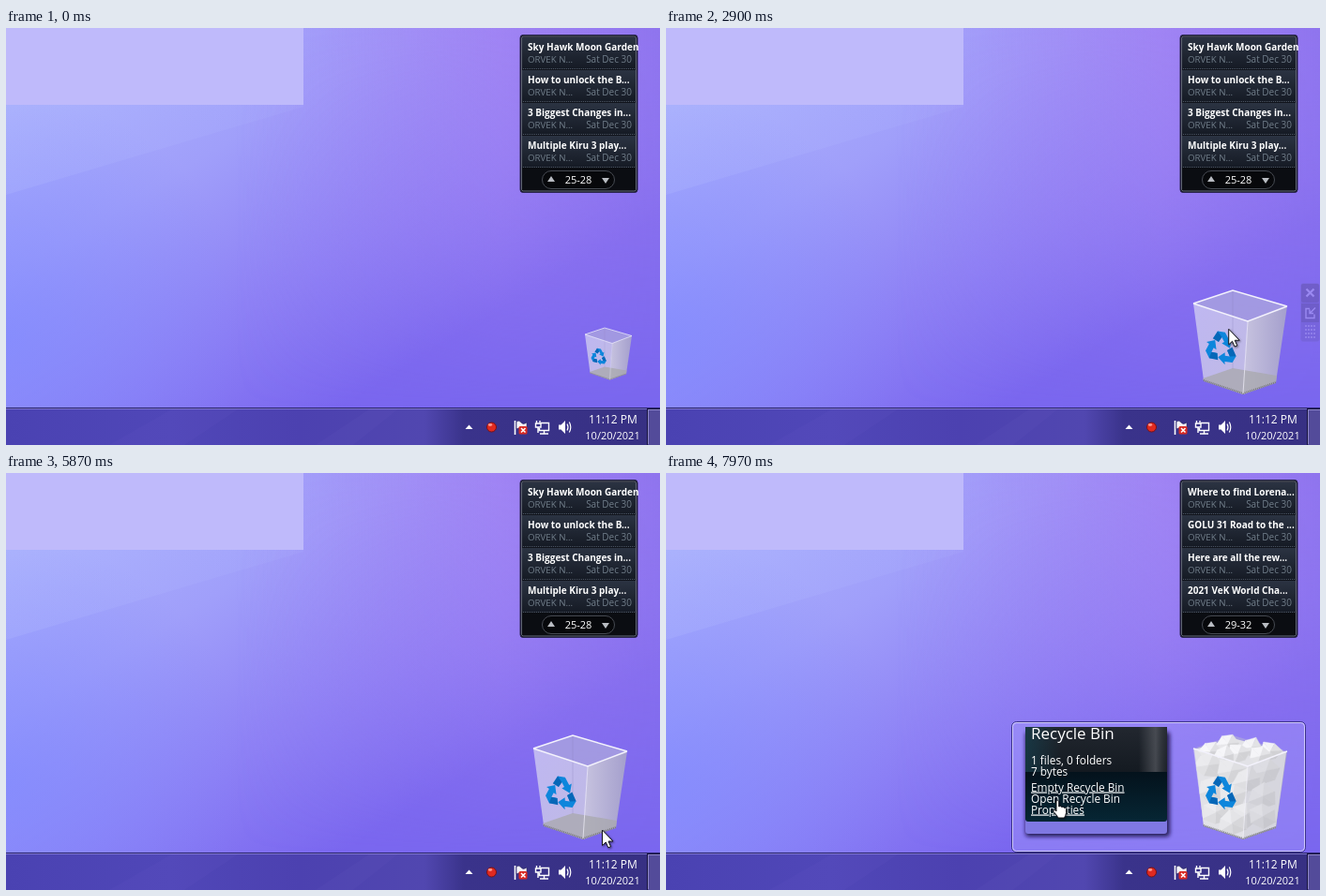
Recreate the animation shown at these times as an HTML page. Size 697 by 445 pixels, loop 8000 ms.

```html
<!DOCTYPE html>
<html lang="en">
<head>
<meta charset="utf-8">
<title>Desktop bin gadget</title>
<style>
html, body { margin: 0; width: 100%; height: 100%; overflow: hidden; background: #8577f2; }
svg { display: block; width: 697px; height: 445px; font-family: "Open Sans", "Noto Sans", sans-serif; }
text { white-space: pre; }
</style>
</head>
<body>
<svg viewBox="0 0 697 445" xmlns="http://www.w3.org/2000/svg">
<defs>
  <linearGradient id="sky" gradientUnits="userSpaceOnUse" x1="90" y1="20" x2="330" y2="420">
    <stop offset="0" stop-color="#a9b0fd"/><stop offset=".35" stop-color="#a09ffa"/>
    <stop offset=".7" stop-color="#8d80f5"/><stop offset="1" stop-color="#7a67ef"/>
  </linearGradient>
  <linearGradient id="side" x1="0" x2="1" y1="0" y2="0">
    <stop offset=".35" stop-color="#a17ff2" stop-opacity="0"/>
    <stop offset=".76" stop-color="#a17ff2" stop-opacity=".8"/>
    <stop offset="1" stop-color="#8f74ee"/>
  </linearGradient>
  <linearGradient id="fade" x1="0" x2="0" y1="0" y2="1">
    <stop offset="0" stop-color="#fff"/><stop offset=".45" stop-color="#aaa"/><stop offset="1" stop-color="#000"/>
  </linearGradient>
  <mask id="upper"><rect width="697" height="405" fill="url(#fade)"/></mask>
  <radialGradient id="corner" gradientUnits="userSpaceOnUse" cx="0" cy="330" r="260">
    <stop offset="0" stop-color="#7f8aff" stop-opacity=".7"/><stop offset="1" stop-color="#7f8aff" stop-opacity="0"/>
  </radialGradient>
  <linearGradient id="ray" x1="0" x2="1" y1="0" y2="0">
    <stop offset="0" stop-color="#b4bcff" stop-opacity=".25"/><stop offset="1" stop-color="#b4bcff" stop-opacity=".1"/>
  </linearGradient>
  <linearGradient id="bar" x1="0" x2="1" y1="0" y2="0">
    <stop offset="0" stop-color="#4a42b2"/><stop offset=".25" stop-color="#5047b8"/>
    <stop offset=".45" stop-color="#4c41b0"/><stop offset=".64" stop-color="#5147b0"/>
    <stop offset=".7" stop-color="#3a338b"/><stop offset="1" stop-color="#373083"/>
  </linearGradient>
  <linearGradient id="news" x1="0" x2="0" y1="0" y2="1">
    <stop offset="0" stop-color="#2b3342"/><stop offset="1" stop-color="#151a24"/>
  </linearGradient>
  <linearGradient id="wallL" x1="0" x2="1" y1="0" y2="1">
    <stop offset="0" stop-color="#d3d0f2" stop-opacity=".75"/><stop offset="1" stop-color="#cbc8e2" stop-opacity=".85"/>
  </linearGradient>
  <linearGradient id="wallR" x1="0" x2="1" y1="0" y2="0">
    <stop offset="0" stop-color="#d0cede" stop-opacity=".9"/><stop offset="1" stop-color="#a9a6c8" stop-opacity=".88"/>
  </linearGradient>
  <linearGradient id="card" x1="0" x2="0" y1="0" y2="1">
    <stop offset="0" stop-color="#22272f"/><stop offset=".47" stop-color="#141a21"/>
    <stop offset=".48" stop-color="#04121c"/><stop offset="1" stop-color="#062634"/>
  </linearGradient>
  <linearGradient id="glow" x1="0" x2="1" y1="0" y2="0">
    <stop offset="0" stop-color="#16404f" stop-opacity=".7"/><stop offset=".25" stop-color="#16404f" stop-opacity="0"/>
    <stop offset=".8" stop-color="#54575e" stop-opacity="0"/><stop offset=".92" stop-color="#54575e" stop-opacity=".75"/>
    <stop offset="1" stop-color="#30343b" stop-opacity=".3"/>
  </linearGradient>
  <linearGradient id="tip" x1="0" x2="0" y1="0" y2="1">
    <stop offset="0" stop-color="#fff"/><stop offset="1" stop-color="#e0e0ee"/>
  </linearGradient>
  <filter id="soft" x="-20%" y="-20%" width="150%" height="150%"><feGaussianBlur stdDeviation="2.2"/></filter>
  <filter id="shade" x="-30%" y="-30%" width="180%" height="180%">
    <feDropShadow dx="1" dy="1" stdDeviation="1" flood-color="#000" flood-opacity=".5"/>
  </filter>
</defs>

<rect width="697" height="445" fill="url(#sky)"/>
<rect width="697" height="405" fill="url(#side)" mask="url(#upper)"/>
<rect width="300" height="405" fill="url(#corner)"/>
<path d="M0 0H317V84L0 178Z" fill="url(#ray)"/>
<rect x="-1" y="-236" width="318" height="318" fill="#bfbafb"/>

<g id="panel">
  <rect x="368.5" y="265.5" width="313" height="139" rx="5" fill="#b3acff" fill-opacity=".3" stroke="#2f2979" stroke-opacity=".85"/>
  <rect x="369.5" y="266.5" width="311" height="137" rx="4" fill="none" stroke="#e0dcff" stroke-opacity=".8"/>
  <rect x="383" y="276" width="154" height="112" rx="4" fill="#14103f" opacity=".85" filter="url(#soft)"/>
  <rect x="383" y="280" width="151" height="105" rx="3" fill="#7f78e2"/>
  <path d="M383 271H534V369Q534 372 531 372H386Q383 372 383 369Z" fill="url(#card)"/>
  <path d="M383 271H534V319H383Z" fill="url(#glow)"/>
  <g id="cardText" fill="#fff"></g>
</g>

<g id="bin">
  <path d="M562 294L604 280L662 297L620 313Z" fill="#aaa4df" fill-opacity=".8"/>
  <path d="M562 294L620 313L615 391L573 376Z" fill="url(#wallL)"/>
  <path d="M620 313L662 297L650 378L615 391Z" fill="url(#wallR)"/>
  <path d="M604 280V364" stroke="#8d88bd" stroke-opacity=".35"/>
  <path d="M572 374L604 363L651 371L650 379L615 391L573 377Z" fill="#a9a8ad" opacity=".75"/>
  <path d="M573 376L615 390L650 378" fill="none" stroke="#77777d" stroke-width="2" stroke-dasharray="1 1"/>
  <g id="paper"></g>
  <path d="M562 294L620 313L662 297" fill="none" stroke="#f3f2fc" stroke-width="1.4"/>
  <path id="rim" d="M562 294L604 280L662 297" fill="none" stroke="#f3f2fc" stroke-width="1.4"/>
  <path d="M620 313L615 390" stroke="#f4f3fb" stroke-opacity=".7"/>
  <g id="mark" transform="matrix(.87 .14 0 .94 591.500 342)"></g>
</g>

<g id="feed">
  <rect x="548" y="7.5" width="125" height="168" rx="3" fill="#10131b" stroke="#2a2550"/>
  <rect x="549.5" y="9" width="122" height="165" rx="2" fill="none" stroke="#9aa0b4" stroke-opacity=".6"/>
  <g id="rows"></g>
  <rect x="550" y="149" width="121" height="24" fill="#0b0d12"/>
  <rect x="571.5" y="152.5" width="77" height="19" rx="9.5" fill="#07080b" stroke="#464a52"/>
  <path d="M577 164L581 158L585 164ZM635 160H643L639 166Z" fill="#b9bcc2"/>
  <g id="listA"></g><g id="listB"></g>
</g>

<g id="tools">
  <rect x="676.5" y="272.5" width="20" height="62" rx="3" fill="#45416e" fill-opacity=".7" stroke="#6c66a8" stroke-opacity=".5"/>
  <rect x="677" y="273" width="19" height="20" rx="2" fill="#2b2a38"/>
  <path d="M682.5 278.5L690.5 286.5M690.5 278.5L682.5 286.5" stroke="#fff" stroke-width="2.200"/>
  <rect x="677" y="294" width="19" height="20" fill="#2b2a38"/>
  <rect id="hot" x="677" y="293" width="19" height="20" fill="#6fbdf0" stroke="#bfe6ff"/>
  <g fill="none" stroke="#fff" stroke-width="1.4">
    <path id="shrink" d="M686 299.500H682V309.500H691V305.500M692 298.500L686.5 304M686 300.500V304.500H690"/>
    <path id="grow" d="M681.5 298.5H691.5V308.5H681.5ZM684 306L689 301M685 301H689V305" stroke="#0c1420"/>
  </g>
  <path id="dots" fill="#c9c8d6"/>
</g>

<g id="taskbar">
  <rect y="405" width="697" height="40" fill="url(#bar)"/>
  <path d="M110 445L180 405H250L190 445ZM330 445L390 405H420L370 445Z" fill="#8176d8" opacity=".05"/>
  <path d="M0 405.5H697" stroke="#29246b"/><path d="M0 406.5H697" stroke="#8f87d8" stroke-opacity=".75"/>
  <rect x="683.5" y="406.5" width="14" height="39" fill="#6a62ad" fill-opacity=".55" stroke="#17143f"/>
  <path d="M684.5 444V407.5H697" fill="none" stroke="#a9a3da" stroke-opacity=".7"/>
  <path d="M489.500 428L493.500 423.500L497.500 428Z" fill="#fff"/>
  <circle cx="517.500" cy="426" r="5" fill="#e02a20" stroke="#7d1014"/>
  <ellipse cx="516" cy="423.500" rx="2.200" ry="1.400" fill="#ff958a"/>
  <path d="M542.500 419V434" stroke="#fff" stroke-width="1.600"/>
  <path d="M544 420Q547 418 549 421T555 421V428Q552 430 549 428T544 428Z" fill="#f4f4fa" stroke="#2b2860" stroke-width=".6"/>
  <rect x="546.500" y="425" width="9" height="8.500" rx="1.500" fill="#d92a23"/>
  <path d="M549 427L553.500 431.500M553.500 427L549 431.500" stroke="#fff" stroke-width="1.500"/>
  <g fill="none" stroke="#fff" stroke-width="1.400">
    <path d="M570 421.500H578.500V429.500H568.500V427M573.500 430V433M569 433H578M565.500 419V422M569 419V422M564.500 422H570V426H564.500ZM567 426V432"/>
    <path d="M598 422.500Q600 426 598 429.500M600.300 420.500Q603.300 426 600.300 431.500" stroke-width="1.200"/>
  </g>
  <path d="M589 423.500H591.500L596 419V433L591.500 428.500H589Z" fill="#fff"/>
  <g id="clock" fill="#fff" text-anchor="middle"></g>
</g>

<g id="file">
  <path d="M-16 0H7L16 9V42H-16Z" fill="#f5f5ff" stroke="#8886ad" stroke-width=".8"/>
  <path d="M7 0V9H16Z" fill="#c9c9e6" stroke="#8886ad" stroke-width=".8"/>
  <text x="-12" y="15" font-size="13" font-weight="700" font-style="italic" style="font-family:'Noto Serif',serif" fill="#4a41a8">A</text>
  <path d="M-13 18.500H13" stroke="#43a0a8" stroke-width="2"/>
  <path d="M0 8H7M0 11.500H12M0 14.500H12M-12 24H-1M-12 27H-1M-12 30H-1M-12 33H-1M-12 37H12" stroke="#a7a5cc"/>
  <rect x="1" y="23" width="12" height="10" fill="#5c9fd8"/><path d="M1 33L6 27L9 30L13 28V33Z" fill="#3a6f83"/>
  <text x="0" y="58" font-size="11" fill="#fff" text-anchor="middle" filter="url(#shade)">sussybaka.rtf</text>
</g>

<g id="hint">
  <rect x="542.500" y="361.500" width="152" height="19" rx="2" fill="url(#tip)" stroke="#767676"/>
  <text x="548" y="375" font-size="11.500" fill="#4c4c55">Click to toggle details view</text>
</g>

<g id="arrow" filter="url(#shade)">
  <path d="M0 0V16.500L3.800 13L6.300 18.800L9 17.600L6.500 12H11.500Z" fill="#fff" stroke="#16161c" stroke-width="1"/>
</g>
<g id="hand" filter="url(#shade)">
  <path d="M3.500 1.500Q5 0 6.200 1.500V7.500Q8 6.200 9 8Q10.800 7 11.600 8.800Q13.800 8 14 10V14Q13.500 17 12 19.500H5.500Q4 16.500 .5 12.800Q-.5 10.500 1.500 10.800L3.500 12.500Z" fill="#fff" stroke="#16161c"/>
</g>
</svg>

<script>
const LOOP = 8000;
const el = id => document.getElementById(id);
const fill = (id, html) => { el(id).innerHTML = html; };
const label = (x, y, size, str, more = "") => `<text x="${x}" y="${y}" font-size="${size}" ${more}>${str}</text>`;

function headlines(titles, range) {
  return titles.map((s, i) => label(556, 24 + 35 * i, 10, s, 'font-weight="700" fill="#fff"')).join("") +
    label(610, 166, 11, range, 'fill="#fff" text-anchor="middle"');
}

fill("rows", [0, 1, 2, 3].map(i => {
  const y = 10 + 35 * i;
  return `<rect x="550" y="${y}" width="121" height="34" fill="url(#news)"/>
    <path d="M551 ${y + 33.5}H671" stroke="#4c5563" stroke-dasharray="1 1"/>` +
    label(556, y + 26.5, 9.7, "ORVEK N...", 'fill="#717e8a"') +
    label(667, y + 26.5, 10, "Sat Dec 30", 'fill="#717e8a" text-anchor="end"');
}).join(""));
fill("listA", headlines(["Sky Hawk Moon Garden", "How to unlock the B...", "3 Biggest Changes in...", "Multiple Kiru 3 play..."], "25-28"));
fill("listB", headlines(["Where to find Lorena...", "GOLU 31 Road to the ...", "Here are all the rew...", "2021 VeK World Cha..."], "29-32"));
fill("clock", label(647, 422, 12, "11:12 PM") + label(646.5, 438.5, 11, "10/20/2021"));

const line = 'text-decoration="underline"';
fill("cardText", label(389, 284, 17, "Recycle Bin") + label(389, 310.5, 11.8, "1 files, 0 folders") +
  label(389, 322.5, 11.8, "7 bytes") + label(389, 339.5, 11.8, "Empty Recycle Bin", line) +
  label(389, 351.5, 11.8, "Open Recycle Bin") + label(389, 363.5, 11.8, "Properties", line));

// Three chasing arrows, each with a dark fold.
fill("mark", [0, 120, 240].map(a => `<g transform="rotate(${a})">
  <path d="M-8 -11L-4 -19H5L10 -11L13 -13L11 -2L1 -6L4 -8L1 -13L-3 -7Z" fill="#0d86dc"/>
  <path d="M-4 -19L1 -13L-3 -7L-10 -10Z" fill="#0667b8"/></g>`).join(""));

// A crumpled ball: six facets, lit from the upper left.
function wad(x, y, r, n, lo, hi) {
  const pts = [...Array(6)].map((_, i) => {
    const a = i * Math.PI / 3 + n, k = r * (.9 + .12 * Math.sin(n * 5 + i * 3));
    return [a, x + k * Math.cos(a), y + k * Math.sin(a) * .9];
  });
  return pts.map(([a, u, v], i) => {
    const [, p, q] = pts[(i + 1) % 6];
    const g = Math.round(lo + (hi - lo) * (.5 - .5 * Math.cos(a + .5 - .8)));
    const tone = `rgb(${g},${g},${g + 3})`;
    return `<polygon points="${x},${y} ${u},${v} ${p},${q}" fill="${tone}" stroke="${tone}" stroke-width=".4"/>`;
  }).join("");
}
const pile = [[580, 297], [644, 297], [599, 289], [624, 293], [610, 299], [633, 302], [595, 302]];
const inside = [[578, 312], [602, 318], [639, 318], [620, 328], [582, 338], [604, 345], [636, 345],
  [586, 362], [619, 364], [636, 366], [603, 374]];
fill("paper", '<path d="M563 295L604 283L661 298L650 377L615 390L573 376Z" fill="#e2e2e7"/>' +
  pile.map(([x, y], i) => wad(x, y, 13, i, 208, 248)).join("") +
  '<clipPath id="walls"><path d="M563 295L620 313L661 298L650 377L615 390L573 376Z"/></clipPath>' +
  '<g clip-path="url(#walls)">' + inside.map(([x, y], i) => wad(x, y, 17, i + 3, 210, 236)).join("") + '</g>' +
  '<path d="M620 313L661 298L650 378L615 391Z" fill="#8d8da0" opacity=".14"/>' +
  '<path d="M573 376L615 390L650 378" fill="none" stroke="#8f8f96" stroke-width="2" stroke-dasharray="1 1"/>');

let dots = "";
for (let r = 0; r < 4; r++) for (let c = 0; c < 4; c++) dots += `M${681 + c * 3} ${317 + r * 4}h2v2h-2z`;
el("dots").setAttribute("d", dots);

const ease = {
  lin: k => k,
  in: k => k * k,
  out: k => 1 - (1 - k) ** 3,
  both: k => k * k * (3 - 2 * k)
};
const ramp = (t, a, b) => Math.min(1, Math.max(0, (t - a) / (b - a)));

// Key: [time, x, y, easing towards it]
function along(keys, t) {
  let i = 1;
  while (i < keys.length - 1 && t > keys[i][0]) i++;
  const [a, x, y] = keys[i - 1], [b, u, v, e = "both"] = keys[i];
  const k = ease[e](ramp(t, a, b));
  return [x + (u - x) * k, y + (v - y) * k];
}
const pointer = [[360, -10, 432], [950, 619, 345, "out"], [1430, 619, 345], [1690, 681, 352],
  [2600, 681, 352], [2890, 618, 327, "in"], [3270, -13, 129, "lin"], [4480, -13, 133, "lin"],
  [4630, 377, 278, "lin"], [5050, 629, 373, "out"], [5330, 629, 373], [5470, 644, 392],
  [5840, 644, 392], [5870, 635.5, 381, "lin"], [7300, 635.5, 381], [7560, 520, 400, "in"], [7850, 416.5, 349.5, "out"]];
const carried = [[4480, -70, 134], [4630, 319, 245, "lin"], [5080, 626, 374, "out"]];

const show = (id, a) => {
  el(id).style.opacity = a;
  el(id).style.visibility = a > 0 ? "visible" : "hidden";
};
const move = (id, x, y) => el(id).setAttribute("transform", `translate(${x.toFixed(2)} ${y.toFixed(2)})`);

function toolsAlpha(t) {
  if (t < 1560) return .2 * ramp(t, 800, 1200);
  if (t < 2200) return .2 + .8 * ramp(t, 1560, 1680);
  if (t < 3600) return 1 - .8 * ramp(t, 2200, 2330);
  if (t < 5900) return .2 * (1 - ramp(t, 3600, 3930));
  if (t < 7300) return .2 * ramp(t, 5900, 6100) + .8 * ramp(t, 6400, 6700);
  return 1 - ramp(t, 7300, 7700);
}

function render(t) {
  const small = t < 2200, full = t >= 5970;
  el("bin").setAttribute("transform", small ? "translate(336 180) scale(.5)" : "");
  show("paper", full ? 1 : 0);
  show("rim", full ? 0 : 1);

  move("tools", 0, small ? 44.5 : 0);
  show("tools", toolsAlpha(t));
  show("hot", small && t > 1600 ? 1 : 0);
  show("grow", small ? 1 : 0);
  show("shrink", small ? 0 : 1);
  el("grow").setAttribute("stroke", t > 1600 ? "#0c1420" : "#fff");

  const swap = ramp(t, 6900, 7050);
  show("listA", 1 - swap);
  show("listB", swap);

  show("hint", ramp(t, 6640, 6780) * (1 - ramp(t, 6830, 6950)));
  show("panel", ramp(t, 6840, 7070));

  const [fx, fy] = along(carried, t);
  move("file", fx, fy);
  show("file", t > 4480 ? .92 * (1 - ramp(t, 5170, 5300)) : 0);

  const [x, y] = along(pointer, t);
  const link = t > 7790;
  const seen = t >= 370 && (t < 3270 || t > 4480);
  move("arrow", x, y);
  move("hand", x - 4, y - 1);
  show("arrow", seen && !link ? 1 : 0);
  show("hand", link ? 1 : 0);
}

const start = performance.now();
function tick() {
  render((performance.now() - start) % LOOP);
  requestAnimationFrame(tick);
}
tick();
</script>
</body>
</html>
```
